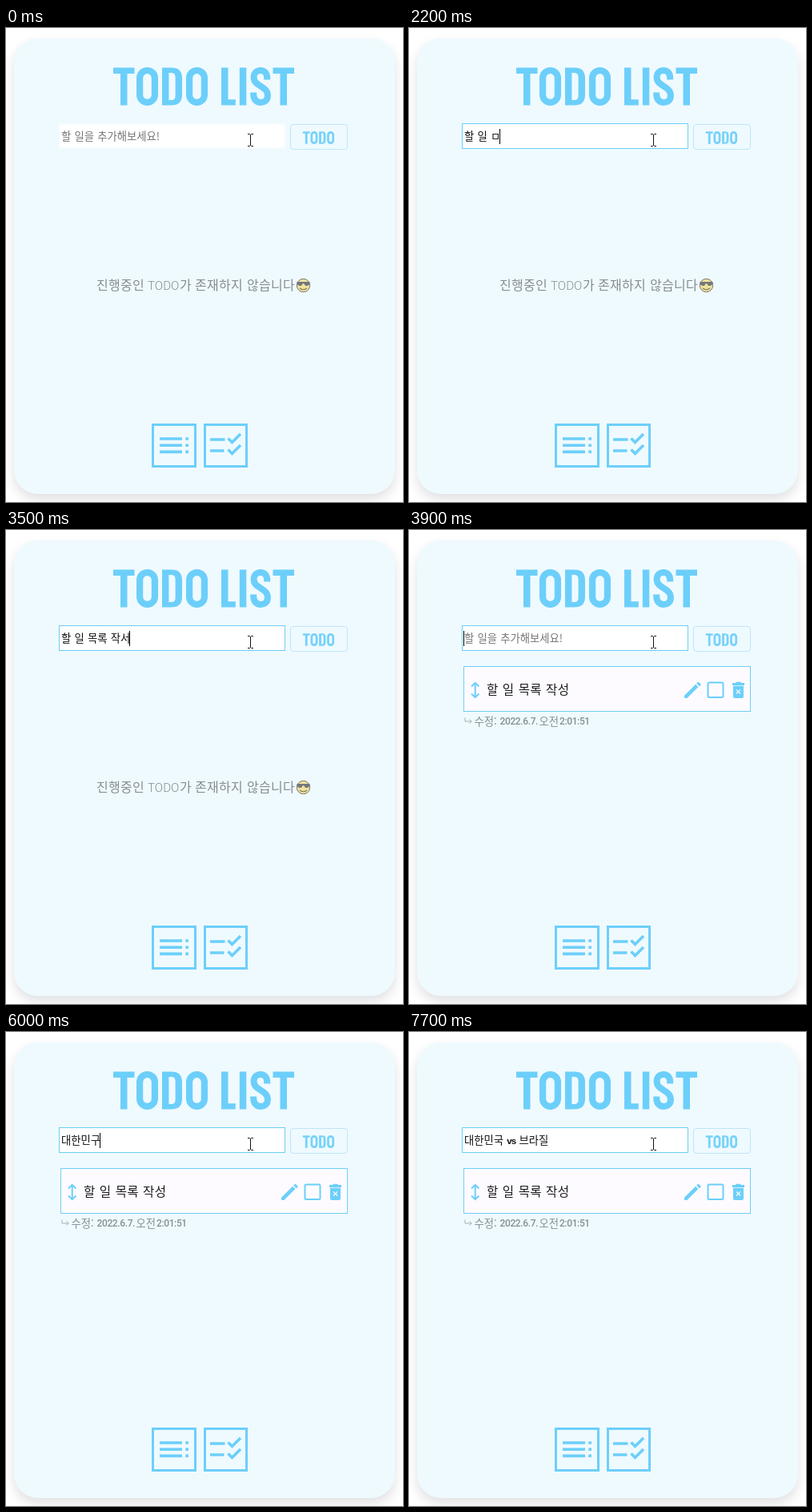
An HTML page that plays this animation: 496x592 px, repeating every 8000 ms.

```html
<!DOCTYPE html>
<html lang="ko">
<head>
<meta charset="utf-8">
<title>TODO LIST</title>
<style>
  html, body { margin: 0; width: 100%; height: 100%; overflow: hidden; background: #fff; }
  .stage { position: relative; width: 496px; height: 592px; overflow: hidden;
    --blue: #6ccffa; --paper: #effaff;
    font-family: "Noto Sans CJK KR", "Noto Sans CJK", sans-serif; }
  .card { position: absolute; left: 10px; top: 13px; width: 476px; height: 569px; border-radius: 30px;
    background: var(--paper); box-shadow: 0 7px 14px rgba(40, 40, 60, .14); }
  svg { position: absolute; left: 0; top: 0; }
  .fill { fill: var(--blue); }
  .line { fill: none; stroke: var(--blue); }
  .message { font-size: 16px; font-weight: 300; letter-spacing: .3px; fill: #868d92; }
  .latin { font: 300 15.2px Roboto, sans-serif; letter-spacing: 0; }
  .task { font-size: 15.6px; font-weight: 300; letter-spacing: .3px; word-spacing: .5px; fill: #1c1c1c; }
  .edited { font-size: 13.33px; font-weight: 300; fill: #859096; }
  .edited .digits { font: 500 12px Roboto, sans-serif; letter-spacing: -.38px; }
  .field { position: absolute; left: 69px; top: 118.5px; height: 32px; line-height: 32px;
    font-size: 13.33px; word-spacing: .5px; white-space: pre; color: #111; }
  .field b { font: bold 11.5px "Liberation Sans", sans-serif; letter-spacing: -.9px; }
  .caret { display: inline-block; width: 1px; height: 19px; margin: 0 0 0 -1px;
    vertical-align: middle; background: #000; }
  .hint { color: #757575; }
</style>
</head>
<body>
<div class="stage">
  <div class="card"></div>
  <svg width="496" height="592" viewBox="0 0 496 592">
    <defs>
      <path id="T" class="fill" d="M0 0H26.5V7.5H17.5V47H9V7.5H0Z"/>
      <path id="O" class="line" stroke-width="8.2" d="M4.1 13a9.4 9.4 0 0 1 18.8 0v21a9.4 9.4 0 0 1-18.8 0z"/>
      <path id="D" class="fill" fill-rule="evenodd" d="M0 0H11C21 0 25 4.500 25 13V34C25 42.500 21 47 11 47H0Z
        M8.400 6.500V40.500H11C15.400 40.500 16.600 38.500 16.600 34.500V12.500C16.600 8.500 15.400 6.500 11 6.500Z"/>
      <g id="todo">
        <use href="#T"/><use href="#O" x="29"/><use href="#D" x="61"/><use href="#O" x="91"/>
      </g>
    </defs>

    <g role="img" aria-label="TODO LIST" transform="translate(134 49.400)">
      <use href="#todo"/>
      <path class="fill" d="M135 0h8.500v39.800h9.300v7.200h-17.800zM157.800 0h8.500v47h-8.500z"/>
      <path class="line" stroke-width="8" transform="translate(171)"
        d="M21.200 15V13C21.200 7 18 3.500 13 3.500S4.600 7 4.600 12C4.600 24 21.900 22.500 21.900 35C21.900 40.500 18.500 43.500 13.200 43.500C7.500 43.500 4.200 39.500 4.200 33V31"/>
      <use href="#T" x="199.500"/>
    </g>

    <rect x="66" y="119" width="283" height="32" rx="2" fill="#fff" opacity=".5"/>
    <rect x="68" y="121" width="279" height="28" fill="#fff"/>
    <rect id="focus" x="66.500" y="119.500" width="282" height="31" fill="#fff" stroke="#6ccff5"/>
    <rect x="355.500" y="120.500" width="71" height="31" rx="3.500" fill="none" stroke="#bfe5f8"/>
    <use href="#todo" transform="translate(370.800 129.200) scale(.333)" role="img" aria-label="TODO" opacity=".92"/>

    <g id="empty">
      <text class="message" y="327"><tspan x="113">진행중인</tspan><tspan class="latin" x="177">TODO</tspan><tspan x="217">가</tspan><tspan x="236">존재하지</tspan><tspan x="301">않습니다</tspan></text>
      <circle cx="371.500" cy="321.500" r="8.200" fill="#efe3a0" stroke="#77746a"/>
      <path d="M363.500 317h16v1.800q-1 3.200-3.800 3.200-2.600 0-3.200-2.800h-2q-.6 2.800-3.200 2.800-2.800 0-3.800-3.200z" fill="#74777a"/>
      <path d="M367 325q4.500 3.500 9 0" fill="none" stroke="#85795a" stroke-width="1.200"/>
    </g>

    <g id="item">
      <rect x="68.500" y="170.500" width="358" height="56" fill="#fdfbff" stroke="#6ccff5"/>
      <path class="line" stroke-width="2" d="M82.700 191.500v17M78 195.500l4.700-4.700 4.700 4.700M78 204.500l4.700 4.700 4.700-4.700"/>
      <text class="task" x="97" y="205">할 일 목록 작성</text>
      <path class="fill" d="M344 206.800v3.200h3.400l14-14-3.300-3.300zM359.200 191.600l1.400-1.400q.8-.7 1.600 0l2.100 2.100q.7.800 0 1.600l-1.500 1.400z"/>
      <rect class="line" x="373.500" y="190.500" width="19" height="18.500" rx="1.500" stroke-width="2"/>
      <path class="fill" d="M404 191h4l1-1.200h5l1 1.200h4v3.200h-15zM405 195h13v13q0 2-2 2h-9q-2 0-2-2z"/>
      <path d="M409 199.300l5 5.200M414 199.300l-5 5.200" stroke="#fdfbff" stroke-width="1.200"/>
      <path d="M70 234.500v4.500h8M75.500 236.500l2.700 2.500-2.700 2.500" fill="none" stroke="#a5afb5"/>
      <text class="edited" y="244"><tspan x="81.500">수정:</tspan><tspan class="digits" x="113.500" y="243">2022.6.7.</tspan><tspan x="162.500" y="244">오전</tspan><tspan class="digits" x="188" y="243">2:01:51</tspan></text>
    </g>

    <g class="line" stroke-width="3">
      <path d="M183.500 495.500h53v52h-53zM248.500 495.500h52v52h-52z"/>
      <path stroke-width="3.600" d="M192 513h28M192 521.200h28M192 529.400h28M224.300 513h3.700M224.300 521.200h3.700M224.300 529.400h3.700"/>
      <path stroke-width="3.600" d="M255 514h18.500M255 528h17.500M277.500 512.500l5 5 10.500-10.500M277.500 526.500l5 5 10.500-10.500"/>
    </g>
  </svg>

  <div class="field" id="field"></div>

  <svg width="496" height="592" viewBox="0 0 496 592">
    <path d="M302 132.500h2.500l1 1 1-1h2.500M305.500 133v14M302 147.500h2.500l1-1 1 1h2.500" fill="none" stroke="#111"/>
  </svg>
</div>

<script>
  const LOOP = 8000;
  const SUBMIT = 3900;
  const HINT = "할 일을 추가해보세요!";

  // [start in ms, field value]
  const typing = [
    [0, ""],
    [1000, "ㅎ"], [1200, "하"], [1500, "할"],
    [1800, "할 ㅇ"], [1900, "할 이"], [2000, "할 일"], [2100, "할 일 "],
    [2200, "할 일 ㅁ"], [2300, "할 일 모"], [2400, "할 일 목"],
    [2600, "할 일 목ㄹ"], [2800, "할 일 목로"], [2900, "할 일 목록"], [3000, "할 일 목록 "],
    [3100, "할 일 목록 ㅈ"], [3200, "할 일 목록 자"], [3300, "할 일 목록 작"],
    [3500, "할 일 목록 작서"], [3600, "할 일 목록 작성"],
    [SUBMIT, ""],
    [5000, "ㄷ"], [5100, "대"], [5200, "댛"], [5300, "대하"], [5400, "대한"],
    [5500, "대한ㅁ"], [5700, "대한미"], [5800, "대한민"], [5900, "대한민ㄱ"],
    [6000, "대한민구"], [6200, "대한민국"], [6300, "대한민국 "],
    [6400, "대한민국 v"], [6600, "대한민국 vs"], [6700, "대한민국 vs "],
    [7100, "대한민국 vs ㅂ"], [7200, "대한민국 vs 브"], [7300, "대한민국 vs 블"],
    [7400, "대한민국 vs 브라"], [7500, "대한민국 vs 브랒"],
    [7600, "대한민국 vs 브라지"], [7700, "대한민국 vs 브라질"]
  ];
  const caretOn = [[100, 600], [1000, 4200], [5000, 7700]];

  const [field, focusRing, empty, item] =
    ["field", "focus", "empty", "item"].map(id => document.getElementById(id));
  const show = (node, on) => { node.style.visibility = on ? "visible" : "hidden"; };
  let shown = null;

  function fieldMarkup(value, blink) {
    const caret = blink ? '<i class="caret"></i>' : "";
    return value
      ? value.replace(/vs?/, "<b>$&</b>") + caret
      : caret + `<span class="hint">${HINT}</span>`;
  }

  function render(t) {
    const value = typing.findLast(([start]) => start <= t)[1];
    const blink = caretOn.some(([from, to]) => t >= from && t < to);
    const markup = fieldMarkup(value, blink);
    if (markup !== shown) field.innerHTML = shown = markup;
    focusRing.style.opacity = Math.min(1, Math.max(0, (t - 50) / 400));
    show(empty, t < SUBMIT);
    show(item, t >= SUBMIT);
  }

  const origin = performance.now();
  function tick() {
    render((performance.now() - origin) % LOOP);
    requestAnimationFrame(tick);
  }
  tick();
</script>
</body>
</html>
```
